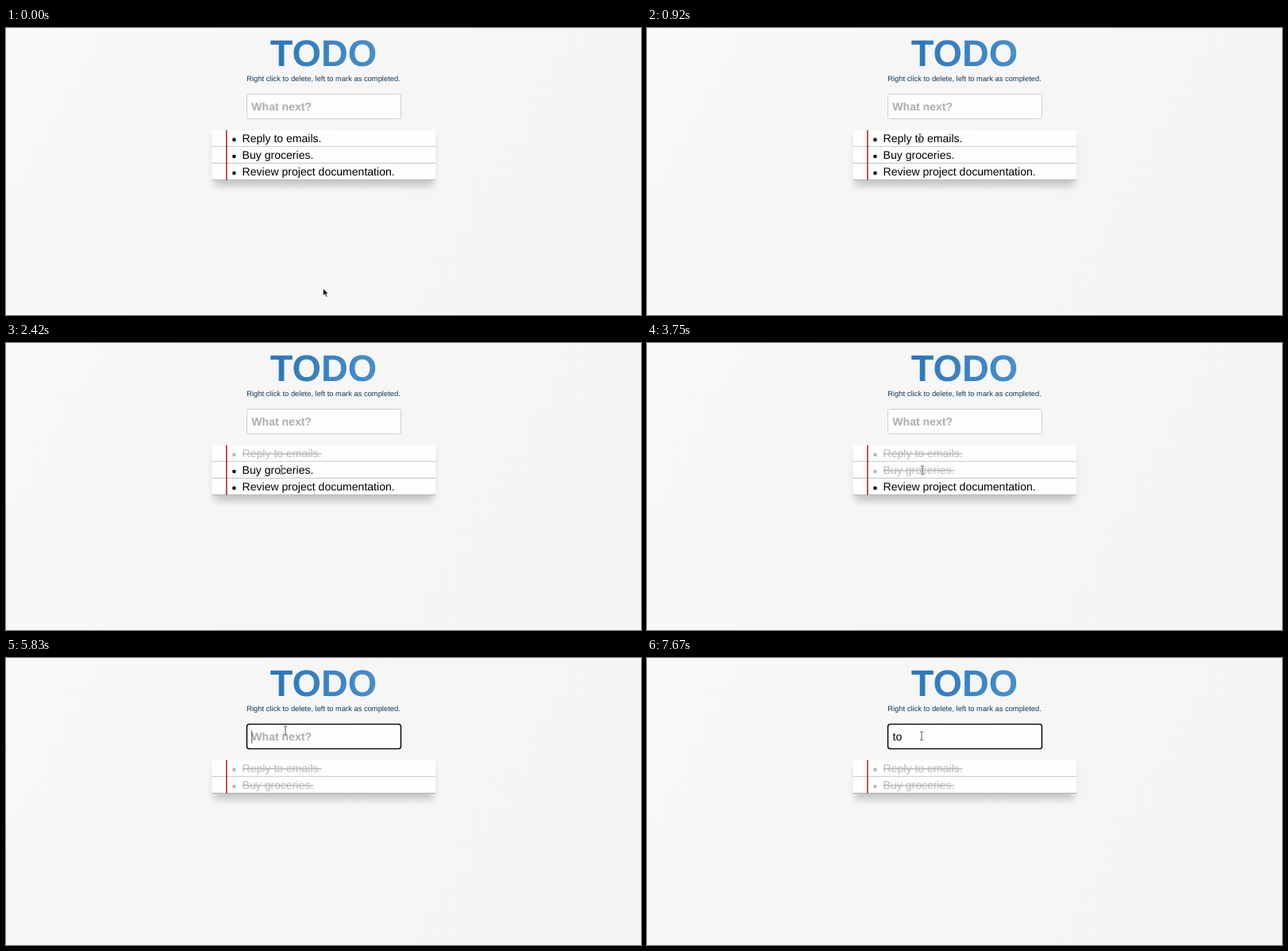
These frames come from a looping animation (800 by 362 pixels, 8000 ms). An HTML page:

```html
<!DOCTYPE html>
<html lang="en">
<head>
<meta charset="utf-8">
<title>TODO</title>
<style>
  html, body { margin: 0; width: 100%; height: 100%; overflow: hidden; }
  svg { display: block; width: 100vw; height: 100vh; }
  text { font-family: "Liberation Sans", Arial, sans-serif; font-size: 14.06px; text-rendering: geometricPrecision; white-space: pre; }
  .title { font-size: 46.85px; font-weight: bold; text-anchor: middle; }
  .hint { font-size: 9.37px; text-anchor: middle; fill: #0d3a5c; }
  .placeholder { font-weight: bold; fill: #adadad; }
  .done { fill: #b9b9b9; }
  .done text { text-decoration: line-through; }
</style>
</head>
<body>
<svg viewBox="0 0 800 362">
  <defs>
    <linearGradient id="page" x2="1" y2="0.25">
      <stop stop-color="#f8f7fa"/><stop offset="1" stop-color="#f6f5f3"/>
    </linearGradient>
    <linearGradient id="ink" gradientUnits="userSpaceOnUse" x1="333" y1="20" x2="467" y2="44">
      <stop stop-color="#2b76b9"/><stop offset="1" stop-color="#488fce"/>
    </linearGradient>
    <filter id="soft" x="-20%" y="-80%" width="140%" height="260%"><feGaussianBlur stdDeviation="5"/></filter>
  </defs>
  <rect width="800" height="362" fill="url(#page)"/>
  <text class="title" x="400" y="47.6" fill="url(#ink)">TODO</text>
  <text class="hint" x="400" y="66.8">Right click to delete, left to mark as completed.</text>

  <rect id="field" x="303.5" y="83.5" width="194" height="31" fill="#fefefc"/>
  <text id="placeholder" class="placeholder" x="309.3" y="104">What next?</text>
  <text id="typed" x="309.5" y="104"></text>
  <rect id="caret" y="91.5" width="0.8" height="16" fill="#222"/>

  <rect id="shadow" x="262" y="136" width="276" filter="url(#soft)" opacity="0.2"/>
  <g id="rows"></g>
  <rect id="margin" x="277.1" y="128.7" width="1.5" fill="#b5182a"/>

  <path id="arrow" d="M0 0V9.2L2.2 7.3L3.8 10.8L5.4 10.1L3.8 6.7H6.6Z" fill="#151515" stroke="#fff" stroke-width="0.6"/>
  <g id="beam" fill="none">
    <path d="M-2 -5.2H-0.6L0 -4.6L0.6 -5.2H2M0 -4.6V4.6M-2 5.2H-0.6L0 4.6L0.6 5.2H2" stroke="#fff" stroke-width="1.8" opacity="0.5"/>
    <path d="M-2 -5.2H-0.6L0 -4.6L0.6 -5.2H2M0 -4.6V4.6M-2 5.2H-0.6L0 4.6L0.6 5.2H2" stroke="#444" stroke-width="0.9"/>
  </g>
</svg>
<script>
const LOOP = 8000, FPS = 12;
const TOP = 128.6, ROW = 21.09;
const $ = id => document.getElementById(id);
const set = (el, attrs) => { for (const k in attrs) el.setAttribute(k, attrs[k]); };
const show = (el, on) => { el.style.display = on ? '' : 'none'; };

// Steps at which each item is completed or removed
const items = [
  { label: 'Reply to emails.', done: 20 },
  { label: 'Buy groceries.', done: 32 },
  { label: 'Review project documentation.', removed: 58 }
];

// Pointer path: step, x, y
const path = [
  [0, 399.5, 328.5], [1, 398, 319], [3, 380, 252], [6, 353, 173], [7, 353, 173],
  [8, 348, 152], [9, 348, 152], [10, 345, 142], [11, 344, 139], [24, 344, 139],
  [27, 346, 152], [29, 347, 160], [45, 347, 160.3], [48, 342.5, 184.3], [63, 342.5, 184.3],
  [66, 348, 128], [68, 353, 84], [70, 352, 91.5], [74, 352, 91.5], [75, 346, 98.3], [96, 346, 98.3]
];

// Caret states: step, visible
const blinks = [[0, false], [70, true], [77, false], [83, true], [92, false]];
const keys = [[0, ''], [84, 't'], [86, 'to']];

items.forEach((item, i) => {
  const y = TOP + i * ROW;
  $('rows').insertAdjacentHTML('beforeend', `<g>
    <rect x="259.5" y="${y}" width="281.7" height="${ROW}" fill="#fefefd"/>
    <rect x="259.5" y="${y + ROW - 0.8}" width="281.7" height="1" fill="#b4b4b4"/>
    <circle cx="287.4" cy="${y + 12.3}" r="2.3"/>
    <text x="297.6" y="${y + 15.5}">${item.label}</text></g>`);
  item.el = $('rows').lastElementChild;
});

const latest = (list, step) => list.filter(([at]) => at <= step).pop()[1];

function pointerAt(step) {
  const i = Math.max(1, path.findIndex(([at]) => at >= step));
  const [a, ax, ay] = path[i - 1], [b, bx, by] = path[i];
  const k = (step - a) / (b - a);
  return [ax + (bx - ax) * k, ay + (by - ay) * k];
}

function draw(time) {
  const step = Math.floor((time % LOOP) * FPS / 1000 + 0.05);
  let count = 0;
  for (const { el, done, removed } of items) {
    const present = !(step >= removed);
    count += present;
    show(el, present);
    set(el, { class: step >= done ? 'done' : '' });
  }
  const height = count * ROW;
  set($('shadow'), { height });
  set($('margin'), { height: height - 0.2 });

  const focused = step >= 70;
  set($('field'), focused
    ? { stroke: '#111', 'stroke-width': 1.6, rx: 3 }
    : { stroke: '#cfcfcf', 'stroke-width': 1, rx: 2 });
  const text = latest(keys, step);
  $('typed').textContent = text;
  show($('placeholder'), !text);
  show($('caret'), latest(blinks, step));
  set($('caret'), { x: 309.4 + ['', 't', 'to'].indexOf(text) * 3.9 * (text.length > 1 ? 1.5 : 1) });

  const [x, y] = pointerAt(step);
  const overText = (y > TOP && y < TOP + height) || (y > 83 && y < 115);
  const transform = `translate(${x} ${y})`;
  set($('arrow'), { transform });
  set($('beam'), { transform });
  show($('arrow'), !overText);
  show($('beam'), overText);
}

function tick() {
  draw(performance.now());
  requestAnimationFrame(tick);
}
tick();
</script>
</body>
</html>
```
